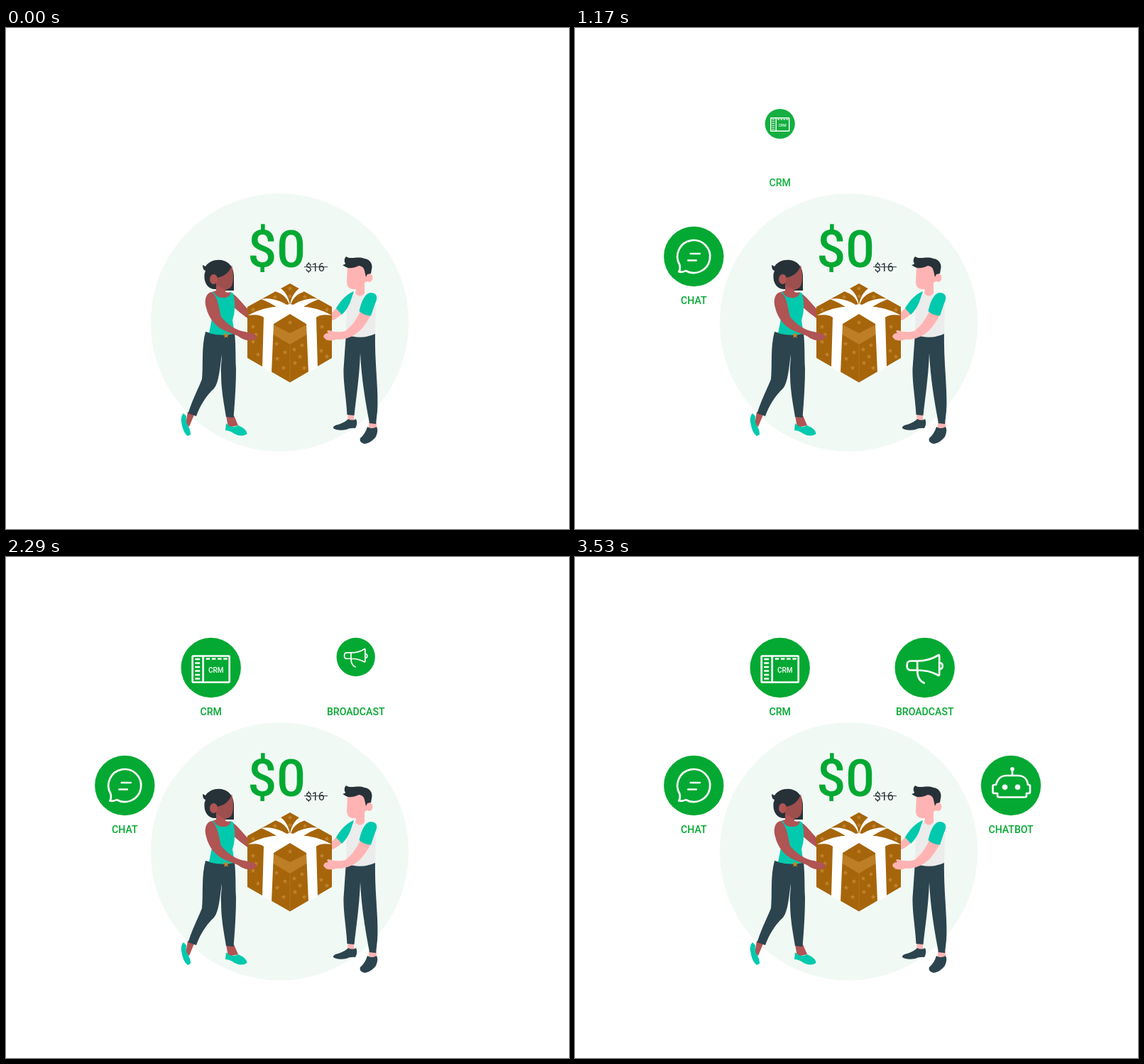
Recreate the animation shown at these times as an HTML page. Size 793 px wide and 706 px high, loop 3610 ms.

```html
<!DOCTYPE html>
<html lang="en">
<head>
<meta charset="utf-8">
<title>Gift offer</title>
<style>
  html, body { margin: 0; width: 100%; height: 100%; overflow: hidden; background: #fff; }
  svg { display: block; width: 793px; height: 706px; }
  text { font-family: Roboto, sans-serif; font-weight: 500; text-anchor: middle; }
  .feature { opacity: 0; fill: #03a932; }
  .feature > text { font-size: 14.1px; }
  .line { fill: none; stroke: #fff; stroke-width: 2.7; stroke-linecap: round; stroke-linejoin: round; }
  .white { fill: #fff; }
  .dark { fill: #263238; }
  .pants { fill: #2b444e; }
  .teal { fill: #00c9ae; }
  .brown { fill: #b05454; }
  .pink { fill: #ffb4b3; }
</style>
</head>
<body>
<svg viewBox="0 0 793 706">
  <defs>
    <path id="star" fill="#c0822c" d="M0-3.600 1.100-1.200 3.600-1 1.600.5 2.200 3 0 1.700-2.200 3-1.600.5-3.600-1-1.100-1.200Z"/>
    <g id="bow" class="white">
      <path d="M400 394C398 382 391 375 379 371L387 367C396 374 400 384 400 394Z"/>
      <path d="M399 392C388 385 374 379 359 382C370 386 378 391 384 395L399 399Z"/>
      <path d="M397 393C376 391 357 396 341 405C352 403 361 405 364 409L377 417 400 403Z"/>
      <path d="M363 408 377 416 374 486 361 478Z"/>
    </g>
  </defs>

  <circle cx="385.5" cy="415" r="181.7" fill="#f1f9f4"/>
  <text x="381.2" y="336.5" font-size="71.5" fill="#03a932">$0</text>
  <text x="435.3" y="343" font-size="16" class="dark" style="font-weight:400">$16</text>
  <path d="M420 336.7H453" stroke="#263238"/>

  <!-- far arms -->
  <path class="brown" d="M314 372C325 375 333 390 346 401V413C335 406 326 398 319 392Z"/>
  <path class="pink" d="M467 393 456 404V413C462 412 468 408 473 403Z"/>

  <!-- woman -->
  <path class="brown" d="M256 541 265 545 258 562 253 558ZM310 546H321L327 560 313 563Z"/>
  <path class="teal" d="M250 543Q246 547 247 555Q249 570 256 575L260 573Q260 566 256 560Q253 556 254 547Z"/>
  <path class="teal" d="M310 557Q317 565 327 560Q339 565 339.500 572Q332 577 322 572Q315 567 309 567Z"/>
  <path class="pants" d="M281 428Q300 434 322 430C324 450 323 465 324 480C324 505 322 530 320.500 549L310 548C307 530 303 510 303 487C302 478 304 470 304 460C301 480 300 499 293 508C281 519 273 533 268 547L256.500 543C262 525 270 510 276 495C278 475 275 450 281 428Z"/>
  <path class="brown" d="M296 360H310L309 372 319 374 316 386H288L290 372 296 370Z"/>
  <path class="teal" d="M289 373 293 372C295 378 301 381 309 380C314 379 317 376 316 372L320 374Q325 393 319 412L322 431Q303 435 286 430L290 410Q283 392 289 373Z"/>
  <path class="dark" d="M277 334 281 336C286 328 298 325 307 328C317 331 321 341 321 350V370H307L296 368C286 369 280 361 279.500 352Q279 346 281 342Q277 341 277 334Z"/>
  <path fill="#9d4f4d" d="M296 352C306 351 315 345 318 334Q320 342 320 350Q320 360 317 365Q310 371 302 368L296 362Z"/>
  <path class="brown" d="M296 362 309 369 307 374 296 373Z"/>
  <ellipse class="brown" cx="292.500" cy="354" rx="5.500" ry="7"/>
  <use href="#star" transform="translate(310 433) scale(1.250)"/>

  <!-- man -->
  <path class="pink" d="M481 543H490V553L482 555ZM511 555H522V565L511 567Z"/>
  <path class="pants" d="M482 551Q488 554 493 551Q496 557 492 564Q485 563 479 566Q467 568 461 564Q460 560 469 558.500Q477 556 482 551Z"/>
  <path class="pants" d="M509 562Q515 566 522 562Q525 567 521 576Q514 585 505 586Q497 584 499 578Q506 572 509 562Z"/>
  <path class="pants" d="M479 430Q500 438 520 430C519 470 525 510 523 540L521 558 512 557C508 535 501 500 499 458C498 490 493 522 490.500 546L480.500 545C479 520 475 500 475.500 480Z"/>
  <path fill="#ebeceb" d="M489 372Q500 380 510 373L521 390 520 431Q500 440 479 432L480 385Z"/>
  <path class="teal" d="M490 371C478 376 470 386 465 395L473 404C479 398 482 393 485 386Z"/>
  <path class="pink" d="M481 335H512V355L505 359V374Q499 381 492 374L493 368H488Q480 367 480 358Z"/>
  <ellipse class="pink" cx="511.500" cy="352" rx="5" ry="6"/>
  <path class="dark" d="M479 322C486 327 495 321 505 325C513 326 517 333 515 340L514 346 509 347 507 351 505 342Q504 336 497 335C489 339 483 339 479 337L474 334Q480 333 477 330Q476 325 479 322Z"/>

  <!-- gift -->
  <path fill="#a6650a" d="M340 393 400 360 459 393V465L400 499.500 340 465Z"/>
  <path fill="#bd7e26" d="M375 417.500 400 430 425 417.500V431L400 446 375 431Z"/>
  <path d="M400 446V499" stroke="#b87820" stroke-width=".8"/>
  <g id="stars"></g>
  <use href="#bow"/>
  <use href="#bow" transform="matrix(-1 0 0 1 800 0)"/>
  <ellipse cx="400" cy="396" rx="8" ry="7" class="white"/>

  <!-- near arms -->
  <path class="brown" d="M289 372C281 374 279 385 282 394C285 408 295 420 305 425C317 431 325 432 331 437C338 441 348 442 354 436C351 429 343 430 337 428C325 427 312 418 303 407C300 395 298 376 289 372Z"/>
  <path class="pink" d="M499 399C493 412 487 420 478 427Q466 430 455 426Q450 426 454 430Q448 430 447 435Q451 442 461 440Q467 438 472 439C485 437 493 432 500 425C506 418 510 412 514 404Z"/>
  <path class="teal" d="M513 373C523 373 524 380 520 388L514 405.500Q504 405 497.500 399C500 388 504 375 513 373Z"/>

  <!-- features: the icon grows down from its top edge -->
  <g class="feature" transform="translate(167.3 280)">
    <g class="icon">
      <circle cy="42" r="42.2"/>
      <g class="line" transform="translate(0 42)">
        <path d="M-20 11.500A23 23 0 1 1-11.500 20Q-15 22.500-21 21.500Q-18.500 18-20 11.500Z"/>
        <path d="M-4.500-4H8.500M-8 5.500H3.500"/>
      </g>
    </g>
    <text y="109">CHAT</text>
  </g>

  <g class="feature" transform="translate(288.7 114)">
    <g class="icon">
      <circle cy="42" r="42.2"/>
      <g class="line" transform="translate(0 42)">
        <rect x="-26" y="-16.500" width="52" height="37" rx="1"/>
        <path d="M-11-16V20"/>
        <path d="M-21.500-12H-16.500M-21.500-6.500H-16.500M-21.500-1H-16.500M-21.500 4.500H-16.500M-21.500 10H-16.500M-21.500 15.500H-16.500" stroke-width="2.400"/>
        <path d="M-7-12.500H24" stroke-width="2.500" stroke-linecap="butt" stroke-dasharray="5.500 2.700"/>
      </g>
      <text x="7" y="49.300" font-size="10" class="white">CRM</text>
    </g>
    <text y="109">CRM</text>
  </g>

  <g class="feature" transform="translate(492.7 114)">
    <g class="icon">
      <circle cy="42" r="42.2"/>
      <g class="line" transform="translate(0 42)">
        <path d="M-10.500-9.500H-19.500Q-25-9.500-25-4V-2Q-25 3.500-19.500 3.500H-10.500C0 3.500 11 6 19.500 11Q20.500 11 20.500 9V-16Q20.500-18 19.500-18C11-12.500 0-9.500-10.500-9.500ZV3.500C-10.500 12-7.500 19-1 21.500"/>
        <path d="M20.500-7Q25-7 25-2.500Q25 2 20.500 2"/>
      </g>
    </g>
    <text y="109">BROADCAST</text>
  </g>

  <g class="feature" transform="translate(614 280)">
    <g class="icon">
      <circle cy="42" r="42.2"/>
      <g class="line" transform="translate(0 42)">
        <path d="M2-14V-22M-21-1C-19-9-14-14-6-14H10C18-14 23-9 24-1H25Q27-1 27 1V9Q27 11 25 11H22V14Q22 16.500 19.500 16.500H-16.500Q-19 16.500-19 14V11H-23Q-25.500 11-25.500 9V1Q-25.500-1-23-1Z"/>
        <g class="white" stroke="none">
          <circle cx="2" cy="-23.300" r="2.800"/>
          <circle cx="-8.500" cy="2.300" r="3.800"/>
          <circle cx="9.500" cy="2.300" r="3.800"/>
        </g>
      </g>
    </g>
    <text y="109">CHATBOT</text>
  </g>
</svg>
<script>
  const LOOP = 3610, TICK = 74, GROW_DELAY = 470;
  const starts = [80, 940, 1820, 2760];
  const features = [...document.querySelectorAll('.feature')];

  const stars = [
    [348, 421], [348, 442], [355, 460], [352, 432], [381, 445], [393, 457], [382, 466], [391, 479],
    [407, 472], [417, 447], [420, 479], [414, 463], [406, 453], [445, 421], [452, 438], [444, 455],
    [452, 463], [400, 367], [379, 379], [421, 379], [400, 378], [348, 397], [452, 397], [400, 415]
  ];
  document.getElementById('stars').innerHTML = stars
    .map(([x, y]) => `<use href="#star" x="${x}" y="${y}"/>`).join('');

  // Linear rise over five held steps, already under way at the first one.
  function ramp(age) {
    if (age < 0) return 0;
    return Math.min(1, 0.286 + 0.214 * Math.floor(age / TICK));
  }

  function draw() {
    const time = performance.now() % LOOP;
    features.forEach((feature, i) => {
      const age = time - starts[i];
      feature.style.opacity = ramp(age);
      const scale = 0.5 + 0.5 * ramp(age - GROW_DELAY);
      feature.querySelector('.icon').setAttribute('transform', `scale(${scale})`);
    });
    requestAnimationFrame(draw);
  }
  draw();
</script>
</body>
</html>
```
